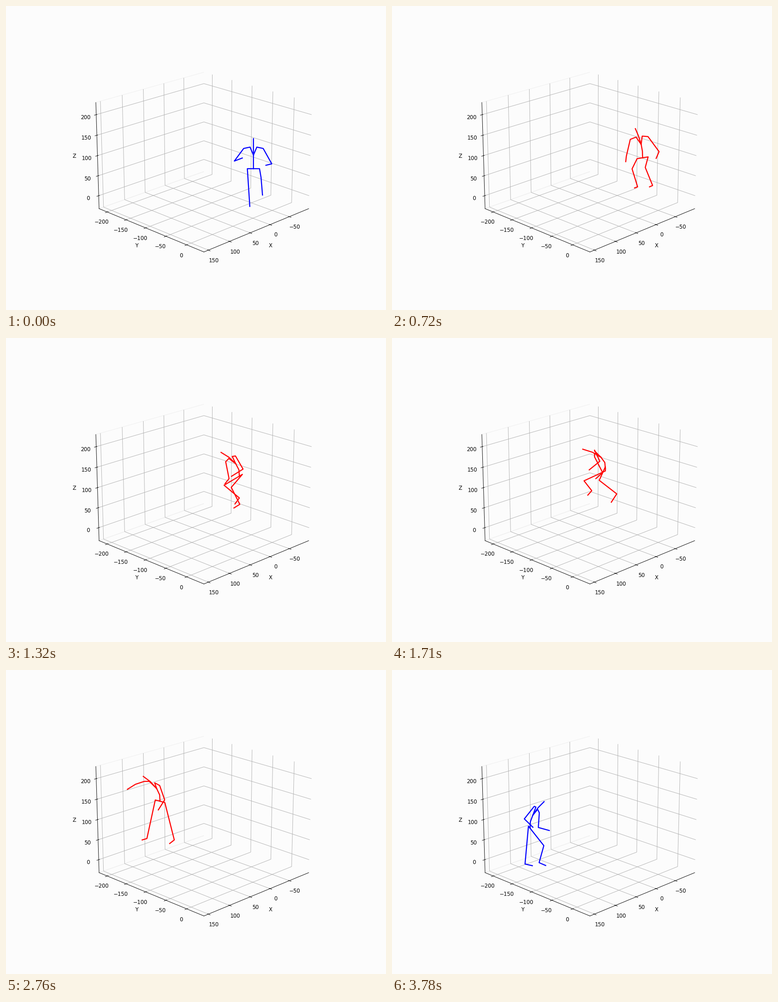
Animation of 837 by 669 pixels, one loop 3810 ms. Source, as a matplotlib script:

```python
import numpy as np
import matplotlib.pyplot as plt
from matplotlib.animation import FuncAnimation

FRAMES, INTERVAL = 127, 30
W, H, DPI = 837, 669, 83.7
BG = "#fcfcfc"
ELEV = 20
TILT = np.sin(np.radians(ELEV))
RED_SPAN = range(17, 97)

# Motion keys by frame: stage pixels and degrees.
PELVIS = {0: (545, 358), 14: (565, 345), 24: (552, 334), 44: (514, 304),
          57: (470, 288), 76: (399, 276), 90: (345, 286), 108: (306, 328),
          126: (304, 348)}
HEADING = {0: 0, 24: 25, 44: 60, 57: 90, 76: 115, 108: 180, 126: 285}
LEAN = {0: 0, 24: -14, 57: -49, 76: -53, 108: -2, 126: 28}
ANKLE_L = {0: (537, 441), 24: (541, 398), 44: (514, 352), 57: (440, 336),
           70: (434, 337), 76: (410, 343), 108: (336, 406), 126: (293, 427)}
ANKLE_R = {0: (565, 416), 24: (574, 395), 36: (573, 388), 44: (515, 366),
           57: (495, 343), 76: (385, 347), 108: (271, 403), 126: (324, 424)}
# Hand seen from its shoulder.
REACH_L = {0: (-3, 21), 24: (-10, 49), 57: (3, 48), 76: (-12, 53),
           108: (6, 54), 126: (-3, 46)}
REACH_R = {0: (6, 37), 14: (24, 46), 24: (18, 48), 50: (-12, 44),
           76: (-10, 42), 99: (-45, 3), 108: (-4, -14), 126: (22, 39)}


def track(keys):
    """Monotone cubic through the keys, one row per frame."""
    x = np.array(list(keys), float)
    v = np.array(list(keys.values()), float).reshape(len(x), -1)
    h = np.diff(x)[:, None]
    d = np.diff(v, axis=0) / h
    prod, total = d[:-1] * d[1:], d[:-1] + d[1:]
    same = prod > 0
    inner = np.where(same, 2 * prod / np.where(same, total, 1), 0)
    m = np.vstack([d[:1], inner, d[-1:]])
    t = np.arange(FRAMES)
    k = np.clip(np.searchsorted(x, t, side="right") - 1, 0, len(x) - 2)
    s = (t - x[k])[:, None] / h[k]
    return (v[k] * (1 + 2 * s) * (1 - s) ** 2
            + v[k + 1] * s ** 2 * (3 - 2 * s)
            + h[k] * s * (1 - s) * (m[k] * (1 - s) - m[k + 1] * s))


def bend(start, end, length, pole, split):
    """Middle joint of a limb whose two bones have the given mean length."""
    gap = np.linalg.norm(end - start, axis=1, keepdims=True)
    height = np.sqrt(np.maximum(length ** 2 - gap ** 2 / 4, 0))
    return start + (end - start) * split + height * pole


heading, lean = np.radians(track(HEADING)), np.radians(track(LEAN))
sin, cos = np.sin(heading), np.cos(heading)
forward = np.hstack([-sin, -TILT * cos])
right = np.hstack([cos, -TILT * sin])

pelvis = track(PELVIS)
trunk = 66 * np.hstack([np.sin(lean), -np.cos(lean)])
head = pelvis + trunk
chest = pelvis + trunk * (0.2, 0.18) - (0, 18)


def spine(t):
    """Parabola through pelvis, chest and head."""
    return (pelvis * (2 * t - 1) * (t - 1) + chest * 4 * t * (1 - t)
            + head * t * (2 * t - 1))


neck = spine(0.78)
yoke = 0.75 * neck + 0.25 * chest


def arm(side, reach):
    out = side * right
    shoulder = yoke + 21.5 * out
    hand = shoulder + track(reach)
    elbow = bend(shoulder, hand, 29, 0.7 * out - forward + (0, 0.25), 0.56)
    return [chest, yoke + 7.5 * out - (0, 3), shoulder, elbow, hand]


def leg(side, steps):
    hip = pelvis + 13.4 * side * right
    ankle = track(steps)
    knee = bend(hip, ankle, 41.5, forward, 0.5)
    shin = ankle - knee
    sole = 0.4 * sin * np.column_stack([-shin[:, 1], shin[:, 0]])
    drop = np.hstack([0 * cos, 3 * (1 - cos)])
    return [pelvis, hip, knee, ankle, ankle + sole + drop]


chains = [
    np.stack(joints, axis=1)
    for joints in ([pelvis, spine(0.25), chest, neck, head],
                   arm(-1, REACH_L), arm(1, REACH_R),
                   leg(-1, ANKLE_L), leg(1, ANKLE_R))
]

# The small surplus keeps the pixel size from rounding down.
fig = plt.figure(figsize=((W + 0.005) / DPI, (H + 0.005) / DPI), dpi=DPI,
                 facecolor=BG)

room = fig.add_subplot(projection="3d")
room.set_facecolor(BG)
room.view_init(elev=ELEV, azim=45)
room.set(xlim=(-101.9, 160.3), ylim=(-221.9, 40.2), zlim=(-32.8, 229.3),
         xticks=range(-50, 151, 50), yticks=range(-200, 1, 50),
         zticks=range(0, 201, 50), xlabel="X", ylabel="Y", zlabel="Z")
room.xaxis.pane.set_visible(False)
for axis in (room.yaxis, room.zaxis):
    axis.pane.set_fill(False)

stage = fig.add_axes([0, 0, 1, 1])
stage.set(xlim=(0, W), ylim=(H, 0))
stage.axis("off")
bones = [stage.plot([], [], lw=2, solid_joinstyle="round")[0] for _ in chains]


def draw(i):
    color = "red" if i in RED_SPAN else "blue"
    for line, path in zip(bones, chains):
        line.set_data(path[i, :, 0], path[i, :, 1])
        line.set_color(color)
    return bones


anim = FuncAnimation(fig, draw, frames=FRAMES, interval=INTERVAL,
                     repeat=True, repeat_delay=0, blit=False)
plt.show()
```
